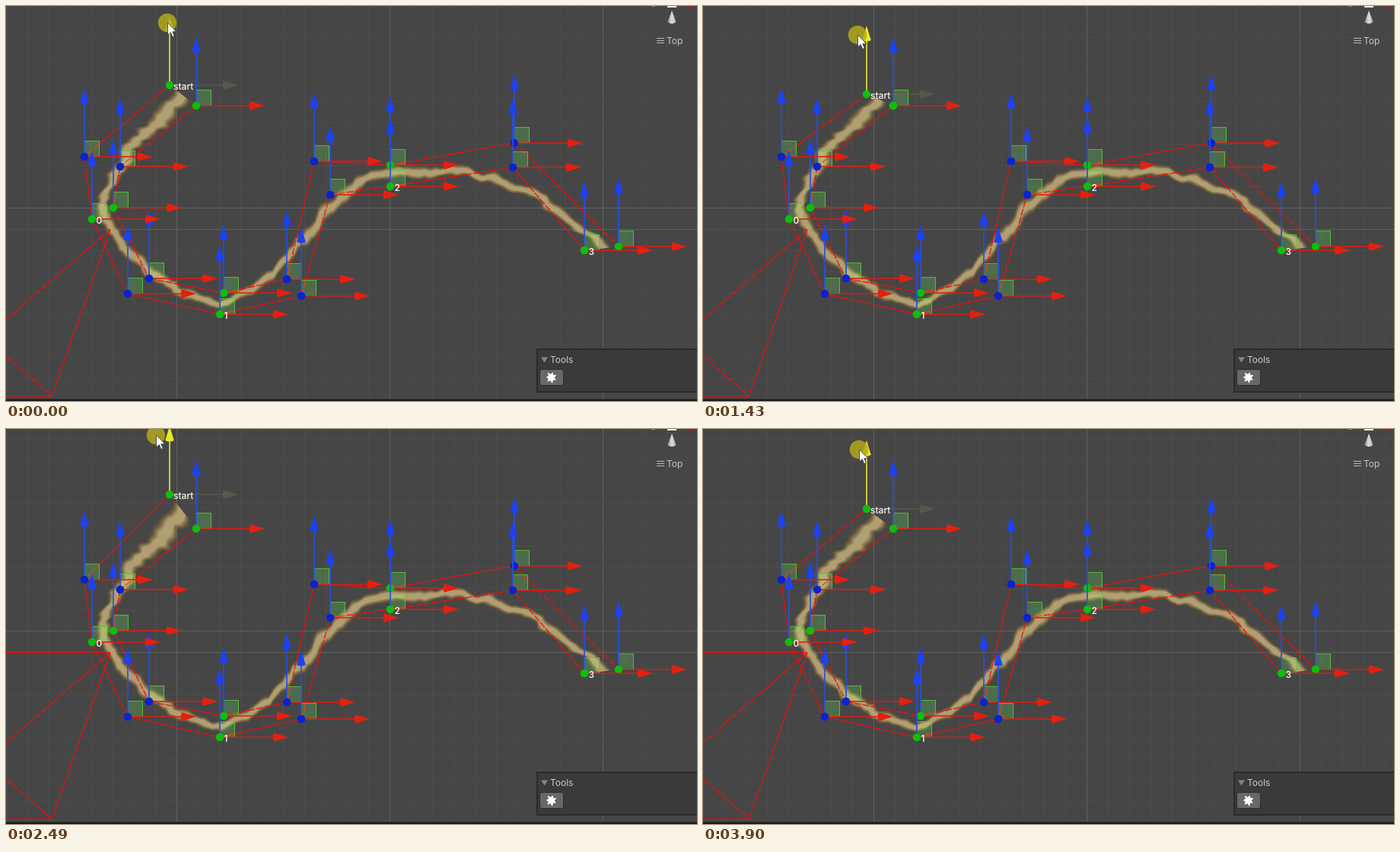
These frames come from a looping animation (908x519 px, 4090 ms). An HTML page with a canvas:

```html
<!DOCTYPE html>
<html lang="en">
<head>
<meta charset="utf-8">
<title>Ribbon editor</title>
<style>
html, body { margin: 0; width: 100%; height: 100%; overflow: hidden; background: #464646; }
canvas { display: block; }
</style>
</head>
<body>
<canvas id="stage" width="908" height="519"></canvas>
<script>
const ctx = document.getElementById('stage').getContext('2d');
const LOOP = 4090, TICK = 64, CELL = 28;
const GREEN = '#0bbf0b', BLUE = '#0a22d0', RED = '#ff0808';

// The drag moves in ticks from each start to each end and rests between.
const drags = [[60, 580], [670, 1180], [1430, 1940], [2030, 2150], [2340, 2850], [2940, 3450], [3510, 3900]];

// Turning points of the drag: time, start height, pointer x
const turns = [
  [0, 104, 212], [300, 84, 212], [734, 126, 211], [950, 88, 207], [1180, 118, 203],
  [1430, 116, 203], [1814, 92, 197], [2468, 86, 197], [3132, 73, 204], [3900, 105, 205]
];

// The two edges of the ribbon: anchors with handles between them
const anchors = [0, 2, 4, 7, 9];
const outer = [[215, 104], [103, 198], [113, 280], [160, 378], [281, 405], [388, 381], [426, 248], [505, 237], [666, 212], [760, 321]];
const inner = [[250, 131], [150, 211], [141, 265], [188, 358], [286, 377], [369, 359], [405, 204], [505, 209], [668, 180], [805, 316]];

const mix = (a, b, k) => a + (b - a) * k;
const mixPt = (p, q, k) => p.map((v, i) => mix(v, q[i], k));

function heldTime(t) {
  const drag = drags.filter(d => d[0] <= t).pop();
  if (!drag) return 0;
  const [from, to] = drag;
  return t >= to ? to : Math.min(to, from + Math.floor((t - from + 8) / TICK) * TICK);
}

function poseAt(t) {
  const i = Math.max(1, turns.findIndex(k => k[0] >= t));
  const a = turns[i - 1], b = turns[i];
  return mixPt(a, b, (t - a[0]) / (b[0] - a[0]));
}

function bezier(pts, u) {
  while (pts.length > 1) pts = pts.slice(1).map((p, i) => mixPt(pts[i], p, u));
  return pts[0];
}

function hash(i) {
  const v = Math.sin(i * 12.9898 + 4.1) * 43758.5453;
  return (v - Math.floor(v)) * 2 - 1;
}

function noise(x) {
  const i = Math.floor(x), f = x - i;
  return mix(hash(i), hash(i + 1), f * f * (3 - 2 * f));
}

function path(pts, close) {
  ctx.beginPath();
  pts.forEach(p => ctx.lineTo(p[0], p[1]));
  if (close) ctx.closePath();
}

function fillPoly(pts, color) {
  path(pts, true);
  ctx.fillStyle = color;
  ctx.fill();
}

function line(p, q, color, width = 1) {
  path([p, q]);
  ctx.strokeStyle = color;
  ctx.lineWidth = width;
  ctx.stroke();
}

function box(x, y, w, h, color) {
  ctx.fillStyle = color;
  ctx.fillRect(x, y, w, h);
}

function text(str, x, y, color, weight = 400) {
  ctx.font = weight + ' 12px Inter, "Liberation Sans", sans-serif';
  ctx.fillStyle = color;
  ctx.fillText(str, x, y);
}

function dot(x, y, r, color) {
  ctx.beginPath();
  ctx.arc(x, y, r, 0, Math.PI * 2);
  ctx.fillStyle = color;
  ctx.fill();
}

function grid() {
  box(0, 0, 908, 519, '#464646');
  const shade = major => major ? '#606060' : '#4c4c4c';
  for (let x = 0; x < 908; x += CELL) line([x + .5, 0], [x + .5, 519], shade(x % 280 === 224));
  for (let y = 13; y < 519; y += CELL) line([0, y + .5], [908, y + .5], shade(y === 265 || y === 293));
}

// Cross-sections along both edges, with a wandering centre and width
function ribbonRows() {
  const rows = [];
  let s = 0, last = null;
  anchors.slice(1).forEach((end, n) => {
    const p = outer.slice(anchors[n], end + 1), q = inner.slice(anchors[n], end + 1);
    for (let i = 0; i <= 90; i++) {
      const l = bezier(p, i / 90), r = bezier(q, i / 90), mid = mixPt(l, r, .5);
      if (last) s += Math.hypot(mid[0] - last[0], mid[1] - last[1]);
      last = mid;
      const centre = .54 + .13 * noise(s / 17) + .05 * noise(s / 7 + 50);
      rows.push([l, r, centre, 1 + .25 * noise(s / 10 + 90)]);
    }
  });
  return rows;
}

function ribbon() {
  const rows = ribbonRows();
  const layers = 6;
  for (let i = 0; i < layers; i++) {
    const k = i / (layers - 1), half = mix(.29, .11, k);
    const rgb = mixPt([120, 92, 40], [186, 170, 124], k).map(Math.round);
    const side = d => rows.map(([l, r, c, w]) => mixPt(l, r, c + d * half * w));
    fillPoly([...side(-1), ...side(1).reverse()], `rgba(${rgb},${mix(.18, .68, k)})`);
  }
}

function wires() {
  const eye = [137, 294], corner = [60.5, 512.5];
  const wire = (p, q) => line(p, q, RED, 1.3);
  ctx.setLineDash([9, 2]);
  for (const edge of [outer, inner]) {
    edge.slice(1).forEach((p, i) => wire(edge[i], p));
  }
  wire(eye, [0, 412]);
  wire(eye, corner);
  wire([0, 460], corner);
  ctx.setLineDash([]);
  line([0, 293.5], [137, 293.5], RED);
  line([0, 512.5], corner, RED);
}

// An arrow along +x, turned to its direction
function arrow([x, y], angle, shaft, head, width) {
  ctx.save();
  ctx.translate(x, y);
  ctx.rotate(angle);
  line([0, 0], [71, 0], shaft, width);
  ctx.beginPath();
  ctx.moveTo(90, 0);
  ctx.lineTo(71, -5.8);
  ctx.quadraticCurveTo(68, 0, 71, 5.8);
  ctx.fillStyle = head;
  ctx.fill();
  ctx.restore();
}

const UP = -Math.PI / 2;

function gizmo(p, color) {
  const [x, y] = p;
  ctx.globalCompositeOperation = 'screen';
  box(x, y - 20, 20, 20, '#0a3408');
  ctx.globalCompositeOperation = 'source-over';
  ctx.strokeStyle = 'rgba(86,205,55,.85)';
  ctx.lineWidth = 1;
  ctx.strokeRect(x + .5, y - 20.5, 19, 20);
  arrow(p, 0, '#e0190f', '#e4200f', 1.3);
  arrow(p, UP, '#264fe6', '#1c42f5', 1.7);
  dot(x, y, 5.3, color);
}

function handles() {
  const colorOf = i => anchors.includes(i) ? GREEN : BLUE;
  inner.forEach((p, i) => gizmo(p, colorOf(i)));
  outer.slice(1).forEach((p, i) => gizmo(p, colorOf(i + 1)));
  anchors.slice(1).forEach((a, i) => text(i, outer[a][0] + 5.5, outer[a][1] + 6, '#fff', 500));
}

function startHandle() {
  const [x, y] = outer[0], faint = 'rgba(112,112,84,.42)';
  arrow([x, y], 0, faint, faint, 1.3);
  arrow([x, y], UP, '#e2e436', '#e8e82a', 1.7);
  dot(x, y, 5.3, y < 75 ? '#b4c61c' : GREEN);
  text('start', x + 5, y + 6, '#f6f6ee', 500);
}

function pointer(x, y) {
  dot(x, y, 12.2, 'rgba(180,169,28,.84)');
  const shape = [[0, 0], [0, 16], [3.7, 12.6], [6.3, 18.5], [8.8, 17.4], [6.3, 11.7], [11.3, 11.7]];
  fillPoly(shape.map(p => [p[0] + x + .5, p[1] + y]), '#fff');
  ctx.strokeStyle = '#333';
  ctx.lineWidth = .8;
  ctx.stroke();
}

function viewCorner() {
  const g = ctx.createLinearGradient(869, 0, 881, 0);
  ['#8f8f8f', '#dedede', '#a2a2a2'].forEach((c, i) => g.addColorStop(i / 2, c));
  ctx.beginPath();
  ctx.moveTo(875, 6);
  ctx.lineTo(880.5, 21);
  ctx.quadraticCurveTo(875, 25.5, 869.5, 21);
  ctx.fillStyle = g;
  ctx.fill();
  box(869, 0, 12, 2, '#ededed');
  box(848, 0, 5, 1, '#8a8a8a');
  box(896, 0, 6, 2, '#a81818');
  for (let i = 0; i < 3; i++) box(855, 42 + 3 * i, 10, 1, '#b8b8b8');
  text('Top', 868, 50, '#c6c6c6');
}

function toolsPanel() {
  box(697, 450, 211, 58, '#2a2a2a');
  box(699, 452, 209, 54, '#3a3a3a');
  fillPoly([[703, 461.5], [712, 461.5], [707.5, 468.5]], '#858585');
  text('Tools', 715, 469, '#cbcbcb');
  ctx.beginPath();
  ctx.roundRect(701.5, 477.5, 31, 21, 3);
  ctx.fillStyle = '#686868';
  ctx.fill();
  ctx.strokeStyle = '#2b2b2b';
  ctx.lineWidth = 1;
  ctx.stroke();
  const star = Array.from({ length: 14 }, (_, i) => {
    const r = i % 2 ? 4.2 : 7.5 + hash(i), a = i * Math.PI / 7 + .5;
    return [716.5 + r * Math.cos(a), 488 + r * Math.sin(a)];
  });
  fillPoly(star, '#fff');
  box(0, 516, 908, 1, '#333');
  box(0, 517, 908, 2, '#1b1b1b');
}

function draw(time) {
  const t = heldTime(time % LOOP);
  const [, y, x] = poseAt(t);
  const grip = 78 + 4 * Math.exp(-t / 200);
  outer[0][1] = y;
  grid();
  ribbon();
  wires();
  handles();
  startHandle();
  viewCorner();
  toolsPanel();
  pointer(x, Math.max(0, y - grip));
}

const began = performance.now();
function frame() {
  draw(performance.now() - began);
  requestAnimationFrame(frame);
}
frame();
</script>
</body>
</html>
```
